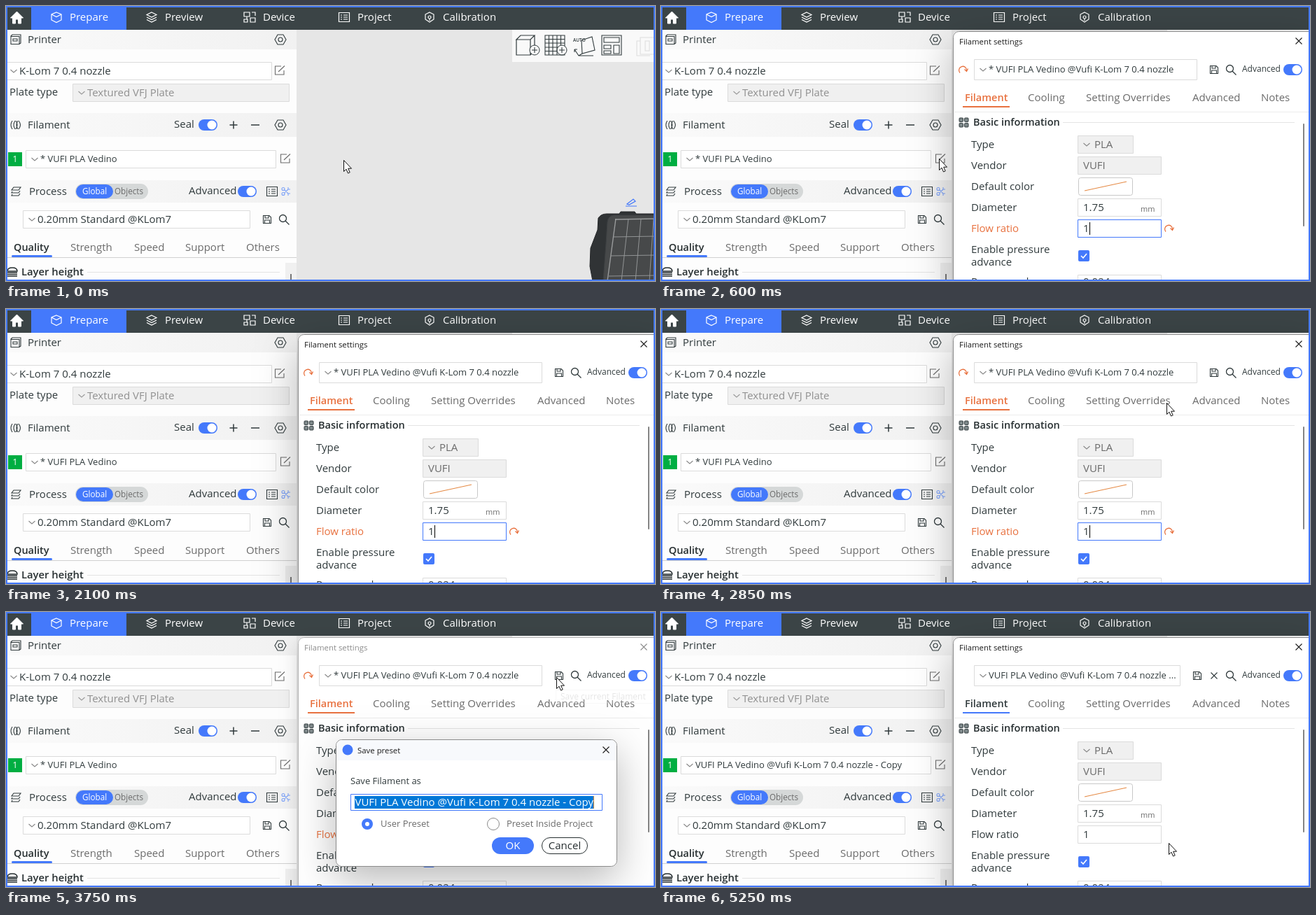
An HTML page with a canvas that plays this animation: 927x393 px, repeating every 5400 ms.

```html
<!DOCTYPE html>
<html lang="en">
<head>
<meta charset="utf-8">
<style>
html, body { margin: 0; width: 100%; height: 100%; overflow: hidden }
canvas { display: block }
</style>
</head>
<body>
<canvas width="927" height="393"></canvas>
<script>
const c = document.querySelector('canvas').getContext('2d');
const BLUE = '#4479fb', DARK = '#303a3c', MID = '#6b6b6b', LINE = '#dbdbdb', ORANGE = '#e8713f';
const LOOP = 5400, STEP = 150;
const OPEN = 600, ASK = 3750, SAVED = 4950;
const MAKER = 'VUFI', FILAMENT = MAKER + ' PLA Vedino', MACHINE = 'K-Lom 7 0.4 nozzle';
const PRESET = FILAMENT + ' @Vufi ' + MACHINE;

// [time, x, y] of the pointer tip
const PATH = [[0, 482, 220], [300, 397, 218], [750, 397, 218], [1050, 546, 268], [1350, 604, 312],
  [1650, 666, 318], [2100, 640, 318], [2250, 640, 292], [2550, 670, 210], [2850, 722, 134],
  [3150, 786, 93], [3900, 786, 93], [4500, 729, 300], [4650, 727, 313], [4800, 725, 330], [5400, 725, 330]];

// y is the middle of the capitals
function text(s, x, y, size = 15, color = DARK, weight = 400, align = 'left') {
  c.font = `${weight} ${size}px "Open Sans", "Noto Sans", sans-serif`;
  c.fillStyle = color;
  c.textAlign = align;
  c.fillText(s, x, y + size * .36);
}
function rect(x, y, w, h, fill) {
  c.fillStyle = fill;
  c.fillRect(x, y, w, h);
}
function round(x, y, w, h, r, fill, stroke) {
  c.beginPath();
  c.roundRect(x, y, w, h, r);
  if (fill) { c.fillStyle = fill; c.fill(); }
  if (stroke) { c.lineWidth = 1; c.strokeStyle = stroke; c.stroke(); }
}
const field = (x, y, w, h, fill = '#fff', stroke = LINE) => round(x + .5, y + .5, w - 1, h - 1, 0, fill, stroke);
const dot = (x, y, r, fill, stroke) => round(x - r, y - r, 2 * r, 2 * r, r, fill, stroke);
function icon(x, y, d, color = DARK, width = 1.1, fill) {
  c.save();
  c.translate(x, y);
  const p = new Path2D(d);
  if (fill) { c.fillStyle = fill; c.fill(p); }
  c.lineWidth = width;
  c.strokeStyle = color;
  c.stroke(p);
  c.restore();
}
function toggle(x, y) {
  round(x, y, 27, 16, 8, BLUE);
  dot(x + 19, y + 8, 6.5, '#fff');
}
const ring = r => `M${r} 0A${r} ${r} 0 1 1 ${-r} 0A${r} ${r} 0 1 1 ${r} 0`;
const CROSS = 'M-4.5-4.5L4.5 4.5M4.5-4.5L-4.5 4.5';
const PLUS = 'M-5.5 0H5.5M0-5.5V5.5';
const SAVE = 'M-5.5-5.5H3L5.5-3V5.5H-5.5ZM-3-5.5V-2H2V-5.5M-3.5 5.5V1H3.5V5.5';
const SEARCH = 'M3.5-1.5A5 5 0 1 1-6.5-1.5A5 5 0 1 1 3.5-1.5M2 2L7.5 7.5';
const EDIT = 'M2-6H-6.5V6H6V0M-2 2L7-6.5';
const GEAR = 'M-4-7H4L8 0 4 7H-4L-8 0Z' + ring(3);
const CHEVRON = 'M-4.5-2L0 2 4.5-2';
const CUBE = 'M0-7L7-4V4L0 7.5-7 4V-4ZM-7-4L0-.5 7-4';
const LAYERS = 'M0-7L7-3.5 0 0-7-3.5ZM-7 0L0 3.5 7 0M-7 3.5L0 7 7 3.5';
const STACK = 'M-3-6H7L4-2H-6ZM6-1L4 2H-6L-5 0M6 3L4 6H-6L-5 4';
const LIST = 'M-7.5-6.5H7.5V6.5H-7.5ZM-5-3H-3M-1-3H5M-5 0H-3M-1 0H5M-5 3H-3M-1 3H5';
const RESET = 'M-4 4.5A5.5 5.5 0 1 1 5.5 1.5M2.5-.5L5.5 2.5 7.5-1.5';
const POINTER = 'M.5 .5V16.5L4 13.2 6.5 19 9.2 17.8 6.7 12.2H11.5Z';

function topBar() {
  rect(0, 0, 927, 34, '#3b4446');
  rect(36, 0, 136, 34, BLUE);
  icon(15.5, 16, 'M-9 1L0-8 9 1H6V9H2V3H-2V9H-6V1Z', '#fff', 1, '#fff');
  const tabs = [['Prepare', 91, CUBE], ['Preview', 227, LAYERS],
    ['Device', 367, 'M-8-7H0V-1H-8ZM3-7H8V-2M-8 3H-3V7H-8ZM1 1H8V7H1ZM-4-1V3'],
    ['Project', 502, LIST], ['Calibration', 624, 'M0-7L6-4V3L0 7-6 3V-4Z' + ring(2) + 'M0 2V5']];
  for (const [s, x, d] of tabs) {
    icon(x - 19, 16, d, '#fff', 1.2);
    text(s, x, 16, 15, '#fff');
  }
}

function header(y, h, s, x, d) {
  const g = c.createLinearGradient(0, 0, 415, 0);
  g.addColorStop(0, '#fafafa');
  g.addColorStop(1, '#f1f1f1');
  rect(2, y, 413, h, g);
  icon(14, y + h / 2, d);
  text(s, x, y + h / 2);
}

function sidePanel(saved) {
  rect(0, 34, 415, 359, '#fdfdfd');
  header(34, 28, 'Printer', 31, 'M-7-5L-5-7H7V5L5 6.5H-7ZM-7-4.5H5V6M-4-1H2V2H-4Z');
  icon(392, 48, GEAR);
  field(1, 80, 379, 26);
  icon(11, 93, CHEVRON, '#888');
  text(MACHINE, 19, 93);
  icon(391, 92, EDIT, MID);
  text('Plate type', 5, 123);
  field(95, 111, 310, 26, '#f0f0f0');
  icon(108, 124, CHEVRON, '#999');
  text('Textured VFJ Plate', 116, 124, 15, '#909090');

  header(153, 34, 'Filament', 31, 'M-5-6Q-9 0-5 6M-1-6Q-5 0-1 6M3-6Q-1 0 3 6M4-6Q9 0 4 6M0-6Q4 0 0 6');
  text('Seal', 240, 169);
  toggle(275, 162);
  icon(325, 170, PLUS, DARK, 1.5);
  icon(356, 170, 'M-6 0H6', DARK, 1.5);
  icon(392, 170, GEAR);
  rect(3, 209, 20, 20, '#00ae42');
  text('1', 13, 219, 12, '#fff', 400, 'center');
  field(28, 206, 358, 26);
  icon(41, 219, CHEVRON, '#888');
  text(saved ? PRESET + ' - Copy' : '* ' + FILAMENT, 49, 218, 13);
  icon(399, 218, EDIT, MID);

  header(249, 32, 'Process', 33, STACK);
  round(99, 254, 104, 22, 11, '#d5d8d8');
  round(100, 255, 53, 20, 10, BLUE);
  text('Global', 109, 265, 11.7, '#fff');
  text('Objects', 155, 265, 11.7, MID);
  text('Advanced', 261, 264);
  toggle(331, 257);
  icon(380, 265, LIST);
  icon(399, 265, 'M-3-1.5A2 2 0 1 1-3-5.5A2 2 0 1 1-3-1.5M-3 5.5A2 2 0 1 1-3 1.5A2 2 0 1 1-3 5.5M-1-2L4 3M-1 2L4-3M4-6V-3H7M4 6V3H7', '#7da2f8');
  field(24, 292, 325, 26);
  icon(37, 305, CHEVRON, '#888');
  text('0.20mm Standard @KLom7', 45, 305);
  icon(373, 305, SAVE);
  icon(397, 305, SEARCH, DARK, 1.3);

  text('Quality', 11, 345, 14.5, '#262e30', 600);
  [['Strength', 92], ['Speed', 183], ['Support', 256], ['Others', 343]]
    .forEach(([s, x]) => text(s, x, 345, 15, MID));
  rect(2, 359, 413, 1, '#d0d0d0');
  round(8, 356, 58, 3, 1.5, BLUE);
  icon(9, 380, 'M-7-1Q-7-6 0-6T7-1ZM-7 1H7M-7 3.5H7M-7 6H7', '#262e30', 1.5);
  text('Layer height', 22, 380, 14.8, '#262e30', 600);
  rect(116, 380, 275, 1, '#e4e4e4');
  rect(399, 367, 16, 24, '#f0f0f0');
  rect(406, 383, 2, 8, '#777');
}

function viewport() {
  rect(415, 34, 512, 359, '#e6e6e6');
  rect(723, 34, 204, 46, '#f9f9f9');
  icon(742, 56, 'M-13-8L-7-14H13L7-8ZM-13-8V14H7V-8M13-14V7L7 14', DARK, 1.2);
  icon(784, 56, 'M-14-14H14V14H-14ZM-14-8.5H14M-14-3H14M-14 3H14M-14 8.5H14M-8.5-14V14M-3-14V14M3-14V14M8.5-14V14');
  for (const x of [755, 794]) {
    dot(x, 63, 7, '#f9f9f9', DARK);
    icon(x, 63, 'M-4 0H4M0-4V4');
  }
  text('AUTO', 810, 49, 6.5, DARK, 600);
  icon(826, 57, 'M-4-8L11-13 15 6-3 11ZM-14 5L-8 14H13M-14 5V9M-14 5H-10M-3 11L-8 14');
  icon(865, 56, 'M-14-14H14V14H-14ZM-11-11H11V-4H-11ZM-11 0H-1V5H-11ZM-11 8H-1V12H-11ZM3 0H11V12H3Z');
  icon(914, 56, 'M-8-11H12V13H-8ZM-8-6H-13V15H6M-1-6H5V8H-1Z', '#dedede');
  icon(893, 281, 'M-6 2L3-5 6-2-3 3ZM-8 5H8', BLUE, 1.2);

  // corner of the print bed
  icon(0, 0, 'M838 393L834 372 835 346 845 320 846 303Q850 297 858 297H876L878 294H898L900 297H930V393Z', '#242628', 1, '#303335');
  icon(0, 0, 'M853 393L857 340 859 309Q860 300 868 299H930V393Z', '#3e4143', 1, '#47494a');
  for (let i = 0; i < 4; i++) {
    const x = 871 + i * 18, y = 305 + i * 24 + i * i;
    icon(0, 0, `M${x} 304L${x - 12 + i * 2} 393M${870 - i * 3} ${y}L930 ${y - 1}`, '#9a9c9d', i ? .9 : 1.4);
  }
}

// window frame; the one in front has a wide, low shadow
function panel(x, y, w, h, active) {
  c.save();
  c.shadowColor = `rgba(0,0,0,${active ? .28 : .16})`;
  c.shadowBlur = active ? 56 : 24;
  c.shadowOffsetY = active ? 18 : 8;
  round(x, y, w, h, 8, '#fff');
  c.restore();
  round(x + .5, y + .5, w - 1, h - 1, 8, '#fff', active ? '#8c8c8c' : '#b4b4b4');
}

const over = (p, x, y, w, h) => p.x >= x && p.x < x + w && p.y >= y && p.y < y + h;
const onDiameter = p => over(p, 595, 275, 120, 26);
const onFlow = p => over(p, 595, 305, 120, 26);

function settings(p, saved, active) {
  panel(417, 36, 518, 380, active);
  const title = active ? '#1c1c1c' : '#8c8c8c', accent = saved ? DARK : ORANGE;
  text('Filament settings', 426, 51, 11.4, title);
  icon(911, 50, CROSS, title);

  field(447, 76, saved ? 295 : 319, 30);
  icon(460, 91, CHEVRON, '#888');
  text(saved ? PRESET + ' ...' : '* ' + PRESET, 468, 90, 13);
  if (saved) icon(790, 91, CROSS);
  else icon(431, 91, RESET, ORANGE, 1.3);
  icon(saved ? 766 : 790, 91, SAVE);
  icon(814, 91, SEARCH, DARK, 1.3);
  text('Advanced', 830, 90, 12);
  toggle(889, 83);

  text('Filament', 434, 131, 14.5, accent, 600);
  [['Cooling', 524], ['Setting Overrides', 607], ['Advanced', 759], ['Notes', 857]]
    .forEach(([s, x]) => text(s, x, 131, 15, MID));
  rect(419, 151, 506, 1, '#ececec');
  rect(431, 143, 67, 2, saved ? BLUE : ORANGE);
  round(917, 168, 2, 147, 1, '#858585');

  for (const x of [426, 433.5]) for (const y of [160, 167.5]) round(x, y, 5.5, 5.5, 1, '#7f898b', DARK);
  text('Basic information', 446, 166, 14.5, '#262e30', 600);
  rect(574, 166, 331, 1, '#e4e4e4');
  ['Type', 'Vendor', 'Default color', 'Diameter', 'Flow ratio', 'Enable pressure']
    .forEach((s, i) => text(s, 443, 198 + i * 30, 15, i == 4 ? accent : DARK));
  text('advance', 443, 366);
  text('Pressure advance', 443, 394);

  field(595, 185, 80, 26, '#f0f0f0');
  icon(608, 198, CHEVRON, '#888');
  text('PLA', 619, 198, 15, MID);
  field(595, 215, 120, 26, '#f0f0f0');
  text(MAKER, 603, 228, 15, MID);
  round(596.5, 245.5, 77, 25, 3, '#fff', '#c8c8c8');
  icon(0, 0, 'M605 264L665 251', '#e58a45', 1.1);
  field(595, 275, 120, 26, '#fff', onDiameter(p) ? BLUE : LINE);
  text('1.75', 603, 288);
  text('mm', 685, 290, 11, MID);
  field(595, 305, 120, 26, '#fff', saved ? LINE : BLUE);
  text('1', 603, 318);
  if (!saved) {
    rect(612, 309, 1, 18, '#000');
    icon(725, 318, RESET, ORANGE, 1.3);
  }
  round(596, 349, 16, 16, 2, BLUE);
  icon(604, 357, 'M-4 0L-1 3 4-3', '#fff', 1.6);
  field(595, 384, 120, 26);
  text('0.024', 603, 394);
}

function savePreset() {
  panel(471, 182, 402, 182, true);
  round(472, 183, 400, 29, [8, 8, 0, 0], '#f7f9fc');
  dot(488, 197, 7.5, BLUE);
  text('Save preset', 502, 198, 11.4, '#1c1c1c');
  icon(857, 197, CROSS, '#1c1c1c');
  text('Save Filament as', 492, 241, 13);
  field(492, 260, 360, 24, '#fff', BLUE);
  rect(498, 263, 341, 18, '#0078d7');
  c.save();
  c.beginPath();
  c.rect(498, 261, 342, 22);
  c.clip();
  text(PRESET + ' - Copy', 839, 272, 15, '#fff', 400, 'right');
  c.restore();
  rect(839, 263, 1, 18, '#e08a3c');
  dot(516, 303, 8, BLUE);
  dot(516, 303, 3, '#fff');
  text('User Preset', 535, 302, 13, MID);
  dot(696, 303, 8.5, '#fff', '#8a8a8a');
  text('Preset Inside Project', 715, 302, 13, MID);
  round(694, 322, 60, 24, 12, BLUE);
  text('OK', 724, 334, 15, '#fff', 400, 'center');
  round(765.5, 322.5, 65, 23, 11.5, '#fff', '#262e30');
  text('Cancel', 798, 334, 15, '#262e30', 400, 'center');
}

function tooltip(alpha) {
  c.save();
  c.globalAlpha = alpha;
  field(785, 111, 139, 20, '#fff', '#ccc');
  text('Save current Filament', 792, 121, 12, '#575757');
  c.restore();
}

function pointerAt(t) {
  const i = PATH.findIndex(p => p[0] > t);
  const [t0, x0, y0] = PATH[i - 1], [t1, x1, y1] = PATH[i];
  const k = (t - t0) / (t1 - t0);
  return { x: x0 + (x1 - x0) * k, y: y0 + (y1 - y0) * k };
}

function draw(now) {
  const t = Math.floor(now % LOOP / STEP) * STEP;
  const p = pointerAt(t), saved = t >= SAVED, asking = t >= ASK && !saved;
  viewport();
  sidePanel(saved);
  topBar();
  if (t >= OPEN) settings(p, saved, !asking);
  if (t >= 3450 && t <= ASK) tooltip(asking ? .15 : 1);
  if (asking) savePreset();
  // the text cursor does not show on the white fields
  if (!onDiameter(p) && !onFlow(p)) icon(p.x, p.y, POINTER, '#111', 1, '#fff');
  c.lineWidth = 2;
  c.strokeStyle = BLUE;
  c.strokeRect(1, 1, 925, 391);
}

const start = performance.now();
function tick() {
  draw(performance.now() - start);
  requestAnimationFrame(tick);
}
tick();
</script>
</body>
</html>
```
